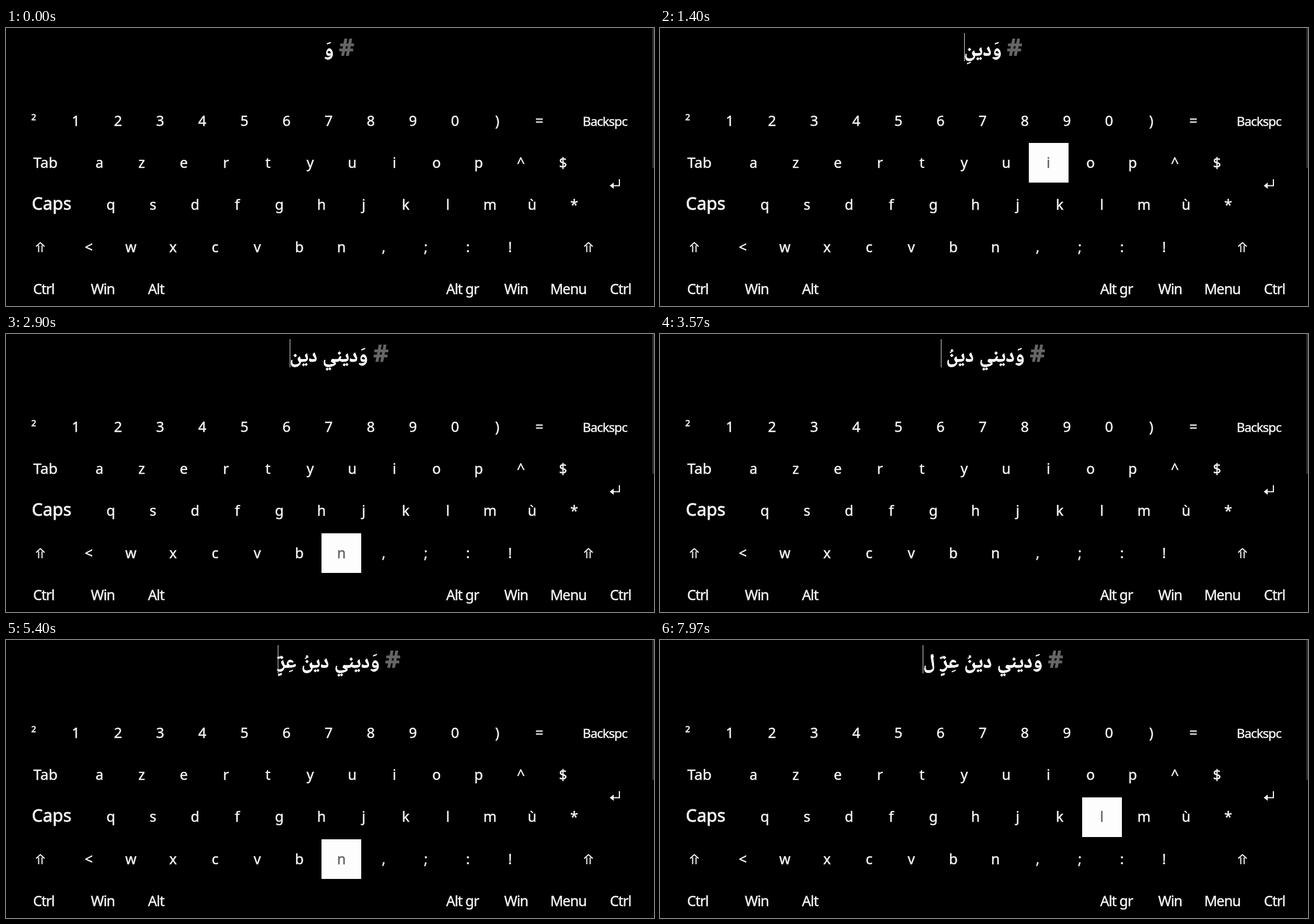
An HTML page for the animation above (8000 ms loop, 1142 by 491 pixels).

```html
<!DOCTYPE html>
<html lang="ar">
<head>
<meta charset="utf-8">
<title>Arabic typing</title>
<style>
html, body { margin: 0; width: 100%; height: 100%; overflow: hidden; background: #000; }
svg { display: block; color: #f4f4f4; }
rect { shape-rendering: crispEdges; }
text { fill: currentColor; stroke: currentColor; stroke-width: .5px; font: 25px "Noto Sans", "Open Sans", sans-serif; text-anchor: middle; }
.word { letter-spacing: -1px; }
.small { font-size: 22.5px; letter-spacing: -1px; }
.tab { font-size: 26px; }
.caps { font-size: 30.5px; stroke-width: .8px; }
.icon { fill: none; stroke: currentColor; stroke-width: 2; }
#line { color: #fff; stroke-width: .7px; font: bold 35.5px "Open Sans", "Noto Naskh Arabic", "Noto Sans Arabic", "DejaVu Sans", sans-serif; direction: rtl; white-space: pre; }
#hash { color: #666; font-size: 42px; }
</style>
</head>
<body>
<svg id="stage" width="1142" height="491" viewBox="0 0 1142 491">
  <rect x="1139" width="3" height="247" fill="#303030"/>
  <text id="line" x="587" y="49"><tspan id="hash">#</tspan><tspan id="typed"></tspan></text>
  <rect id="caret" y="9" width="1" height="50" fill="#ddd"/>
  <path class="icon" d="M57.5 396V384M63.5 396V384M53 386L60.5 379L68 386"/>
  <path class="icon" d="M1023.5 396V384M1029.5 396V384M1019 386L1026.5 379L1034 386"/>
  <path class="icon" d="M1081 267V278.5H1067"/>
  <path fill="currentColor" d="M1064 278.5L1071 273V284Z"/>
</svg>
<script>
const PITCH = 74.25, LOOP = 8000, HOLD = 125, BLINK = 530, CENTER = 587;
const $ = id => document.getElementById(id);
const stage = $("stage"), line = $("line"), typed = $("typed"), caret = $("caret");
const keys = {};

function add(tag, attrs, content = "") {
  const node = document.createElementNS("http://www.w3.org/2000/svg", tag);
  for (const name in attrs) node.setAttribute(name, attrs[name]);
  node.textContent = content;
  return stage.appendChild(node);
}

function addKey(label, x, row, width = 70, style = "") {
  const y = 129 + PITCH * row;
  const box = add("rect", { x: x - width / 2, y, width, height: 70, fill: "#fdfdfd", visibility: "hidden" });
  const text = add("text", { x, y: y + 43.8, class: style }, label);
  return { box, text };
}

[["²1234567890)=", 49], ["azertyuiop^$", 164.8], ["qsdfghjklmù*", 184.7], ["<wxcvbn,;:!", 145.8]]
  .forEach(([labels, x], row) =>
    [...labels].forEach((c, i) => keys[c] = addKey(c, x + i * PITCH, row)));
keys[" "] = addKey("", 535, 4, 439);

addKey("Backspc", 1055.5, 0, 70, "small");
addKey("Tab", 69.5, 1, 70, "tab");
addKey("Caps", 80.5, 2, 70, "caps");
[["Ctrl", 66.5], ["Win", 170.5], ["Alt", 264.5], ["Alt gr", 804.5], ["Win", 899], ["Menu", 991], ["Ctrl", 1083]]
  .forEach(([label, x]) => addKey(label, x, 4, 70, "word"));

// The joiner keeps the kasra below its letter when a shadda sits above
const KASRA = "\u0650", KASRATAN = "\u064d", SHADDA = "\u0651", JOINER = "\u034f";

// Each stroke: time, key, letters added, letters removed first
const strokes = [
  [200, "d", "د"], [450, "i", KASRA], [650, "i", "ي", 1],
  [1020, "n", "ن"], [1330, "i", KASRA], [1500, "i", "ي", 1], [1750, " ", " "],
  [2050, "d", "د"], [2400, "i", KASRA], [2560, "i", "ي", 1],
  [2800, "n", "ن"], [2980, "u", "\u064f"], [3170, " ", " "],
  [3700, "3", "ع"], [3950, "i", KASRA],
  [4600, "z", "ز"], [4910, "z", SHADDA],
  [5150, "i", KASRA + JOINER + SHADDA, 1], [5330, "n", KASRATAN + JOINER + SHADDA, 3],
  [6010, " ", " "], [7850, "l", "ل"]
];

let shown = "", lit = null;

function light(key) {
  if (key === lit) return;
  if (lit) {
    lit.box.setAttribute("visibility", "hidden");
    lit.text.style.color = "";
  }
  if (key) {
    key.box.setAttribute("visibility", "visible");
    key.text.style.color = "#666";
  }
  lit = key;
}

function draw(now) {
  const t = now % LOOP;
  let text = " و\u064e", last = -700, key = null;
  for (const [at, name, letters, removed = 0] of strokes) {
    if (at > t) break;
    text = text.slice(0, text.length - removed) + letters;
    last = at;
    key = t - at < HOLD || name === "l" ? keys[name] : null;
  }
  if (text !== shown) typed.textContent = shown = text;
  light(key);
  caret.setAttribute("x", Math.round(CENTER - line.getComputedTextLength() / 2));
  caret.setAttribute("visibility", (t - last) % (2 * BLINK) < BLINK ? "visible" : "hidden");
  requestAnimationFrame(draw);
}
draw(0);
</script>
</body>
</html>
```
